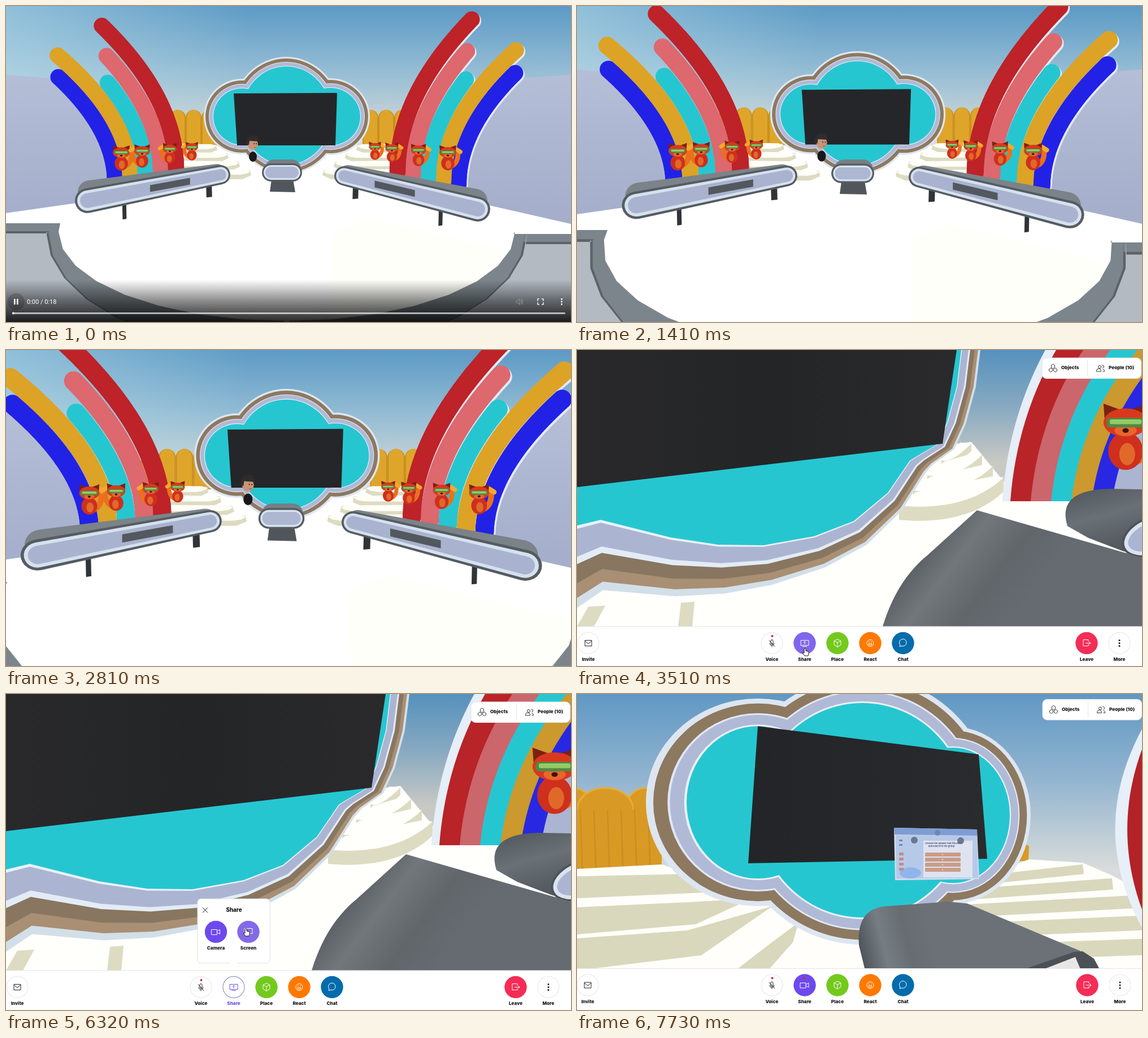
An HTML page with a canvas for the animation above (8000 ms loop, 1000 px wide and 560 px high).

```html
<!DOCTYPE html>
<html lang="en">
<head>
<meta charset="utf-8">
<title>Virtual stage</title>
<style>
html, body { margin: 0; width: 100%; height: 100%; overflow: hidden; background: #fff; }
canvas { display: block; }
</style>
</head>
<body>
<canvas id="stage" width="1000" height="560"></canvas>
<script>
const g = document.getElementById('stage').getContext('2d');
const LOOP = 8000, STEP = 702;
const CX = 495, CY = 272;
const TEAL = '#26c6d1', LAVENDER = '#abb5d2', CREAM = '#dddbc1', PURPLE = '#6c49ef';
const ARCH = ['#2222e6', '#dca326', TEAL, '#dd686e', '#bd2328'];
let zoom = 0;

const range = n => [...Array(n).keys()];
const lerp = (a, b, t) => a + (b - a) * t;
// Scenery is laid out for the left side; side 1 flips it to the right.
const mirror = (side, pts) => pts.map((v, i) => i % 2 || side < 0 ? v : 994 - v);

// Perspective dolly: k is how strongly a point approaches the camera.
function project(x, y, k) {
  if (typeof k === 'function') k = k(x, y);
  const s = 1 / (1 - k * zoom);
  return [CX + (x - CX) * s, CY + (y - CY) * s, s];
}
const deskDepth = x => .108 + .00026 * Math.abs(x - CX);
const archDepth = (x, y) => .077 + .00019 * Math.abs(x - CX) - .0001 * (y - CY);
const foxDepth = x => .09 + .00025 * Math.abs(x - CX);
const floorDepth = (x, y) => .1 + .0008 * (y - CY);

function shape(fill, pts, k = 0) {
  g.beginPath();
  for (let i = 0; i < pts.length; i += 2) {
    const [x, y] = project(pts[i], pts[i + 1], k);
    g.lineTo(x, y);
  }
  g.closePath();
  g.fillStyle = fill;
  g.fill();
}
function oval(fill, x, y, rx, ry = rx, k = 0) {
  const [px, py, s] = project(x, y, k);
  g.beginPath();
  g.ellipse(px, py, rx * s, ry * s, 0, 0, 7);
  g.fillStyle = fill;
  g.fill();
}
function draw(d, fill, stroke, width = 1) {
  const p = new Path2D(d);
  if (fill) { g.fillStyle = fill; g.fill(p); }
  if (stroke) { g.strokeStyle = stroke; g.lineWidth = width; g.stroke(p); }
}
function at(x, y, s, paint) {
  g.save();
  g.translate(x, y);
  g.scale(s, s);
  paint();
  g.restore();
}
function blend(x0, y0, x1, y1, ...stops) {
  const b = g.createLinearGradient(x0, y0, x1, y1);
  stops.forEach((c, i) => b.addColorStop(i / (stops.length - 1), c));
  return b;
}
function rect(fill, x, y, w, h, r = 0, stroke) {
  g.beginPath();
  g.roundRect(x, y, w, h, r);
  g.fillStyle = fill;
  g.fill();
  if (stroke) { g.strokeStyle = stroke; g.lineWidth = 1; g.stroke(); }
}
function text(s, x, y, size, color = '#111', align = 'center', font = '800') {
  g.font = `${font} ${size}px ${font === '800' ? 'Inter' : 'Roboto'}, sans-serif`;
  g.fillStyle = color;
  g.textAlign = align;
  g.textBaseline = 'middle';
  g.fillText(s, x, y);
}
function capsule(fill, k, x1, y1, r1, x2, y2, r2) {
  const axis = Math.atan2(y2 - y1, x2 - x1);
  shape(fill, range(26).flatMap(i => {
    const far = i < 13, a = axis - Math.PI / 2 + Math.PI * (far ? i : i - 1) / 12;
    const [x, y, r] = far ? [x2, y2, r2] : [x1, y1, r1];
    return [x + Math.cos(a) * r, y + Math.sin(a) * r];
  }), k);
}
function bend(x0, y0, cx, cy, x1, y1) {
  return range(25).flatMap(i => {
    const t = i / 24;
    return [lerp(lerp(x0, cx, t), lerp(cx, x1, t), t), lerp(lerp(y0, cy, t), lerp(cy, y1, t), t)];
  });
}
// Three overlapping lobes [x, y, rx, ry, frame x, frame y], painted from the rim inwards.
function cloud(lobes, k) {
  const rims = [[1, '#dde6f0'], [.82, '#8d7960'], [.47, '#e0e7f2'], [.41, '#b0b9d6'], [.06, '#e9f1f8'], [0, TEAL]];
  for (const [f, color] of rims)
    for (const [x, y, rx, ry, gx, gy] of lobes) oval(color, x, y, rx + gx * f, ry + gy * f, k);
}
function fox(x, y, s, flip = 1) {
  at(x, y, s, () => {
    g.scale(flip, 1);
    g.lineCap = 'round';
    draw('M6 15Q17 10 17-6', 0, '#ea701d', 8);
    draw('M13-14L21-9', 0, '#f5a92e', 7);
    for (const e of [-1, 1]) shape('#7d2014', [14 * e, -20, 3 * e, -16, 13 * e, -7]);
    oval('#cf2f1d', 0, 10, 11, 12);
    oval('#e0692a', 1, 12, 5, 7);
    oval('#d9381d', 0, -8, 14, 9);
    oval('#e8662a', 0, -3, 7, 3.5);
    rect('#4d8a45', -12, -11, 24, 6, 2);
    rect('#93cc66', -10, -10, 20, 3, 1);
    oval('#3a1510', 0, -3, 2, 1.5);
  });
}
function person(x, y, s) {
  at(x, y, s, () => {
    oval('#18181b', 1, 24, 7, 9);
    oval('#c99478', 1, 2, 9, 10);
    draw('M-10 3Q-12-12 2-14Q12-13 10-3L-5-4-6 3z', '#302c2b');
    oval('#2b2120', 3, 1, 1);
    oval('#2b2120', 7, 1, 1);
    rect('#8d5148', 3, 7, 4, 1);
  });
}

function fence(x, side) {
  for (const i of range(4)) {
    const cx = x + side * i * 28;
    for (const [c, r] of [['#c8901f', 14], ['#dfa52b', 12]]) {
      oval(c, cx, 198, r, 14, .09);
      shape(c, [cx - r, 198, cx + r, 198, cx + r, 250, cx - r, 250], .09);
    }
  }
}
function wall(side, slope) {
  const base = side < 0 ? 347 : 353;
  shape(blend(0, 120, 0, 360, '#b5bed7', '#a5afcb'),
    mirror(side, [-300, 100, 150, 133, 240, 300, 140, base, -300, base + 440 * slope]), .15);
}
function stairs(side) {
  for (const i of range(4)) {
    const y = 246 + 15 * i, e = 372 + 20 * i;
    shape(CREAM, mirror(side, [290, y, e, y, e + 2, y + 9, e - 14, y + 16, 290, y + 17]), .115);
    shape('#fffef8', mirror(side, [290, y - 2, e - 8, y - 1, e + 1, y + 2, e - 6, y + 6, e - 18, y + 8, 290, y + 8]), .115);
  }
}
// Every band is a parabola that stands upright on the floor and leans outwards.
function rainbow(side, lift, drop) {
  const heights = [187, 221, 166, 207, 255];
  const band = (i, color, shift) => {
    for (let h = 0; h <= heights[i]; h += 3) {
      const x = 193 + 27 * i - (.0029 - .00022 * i) * h * h, y = 312 - 5.5 * i + drop - h * lift;
      oval(color, (side < 0 ? x : 994 - x) + shift, y + shift, 14.3, 14.3, archDepth);
    }
  };
  if (side > 0) ARCH.forEach((_, i) => band(i, '#e3e8f3', 2.5));
  ARCH.forEach((c, i) => band(i, c, 0));
}
function desk(nx, ny, fx, fy) {
  const side = Math.sign(fx - nx), on = t => [lerp(nx, fx, t), lerp(ny, fy, t)];
  for (const [t, w, drop] of [[.275, 3.5, 46], [.91, 5, 36]]) {
    const [x, y] = on(t);
    shape('#303438', [x - w, y, x + w, y, x + w + side, y + drop - 1, x - w + side, y + drop], deskDepth);
  }
  capsule('#7b8389', deskDepth, nx + 4 * side, ny - 15, 21, fx - 7 * side, fy - 3, 16);
  for (const [c, d] of [['#555c61', 0], ['#d5e1ee', 4], ['#a9b3cf', 9]])
    capsule(c, deskDepth, nx, ny, 22 - d, fx, fy, 17 - d * .8);
  const [ax, ay] = on(.47), [bx, by] = on(.77);
  shape('#52585d', [ax, ay - 6, bx, by - 5, bx, by + 7, ax, ay + 6], deskDepth);
}
function podium() {
  shape('#50565b', [470, 307, 508, 307, 512, 330, 467, 329], .13);
  capsule('#777f85', .13, 474, 288, 16, 506, 288, 16);
  for (const [c, r] of [['#555c61', 16], ['#d8e3ef', 13], ['#adb7d2', 10]])
    capsule(c, .13, 469, 295, r, 508, 295, r);
}
function pit(side, top) {
  const ring = (rx, ry, y) => {
    const arc = range(9).flatMap(i => {
      const a = i / 8 * Math.PI / 2;
      return [493 - rx * Math.cos(a), 400 + ry * Math.sin(a)];
    });
    return mirror(side, [-300, y, 493 - rx + 3, y, ...arc, 493, 640, -300, 640]);
  };
  shape('#7c858b', ring(400, 158, top), floorDepth);
  shape('#5b6268', ring(418, 215, top + 14), floorDepth);
  shape('#b3bac2', ring(422, 215, top + 18), floorDepth);
}

function overview() {
  rect(blend(0, 0, 0, 240, '#5c9ac5', '#97bed5', '#dcdcd6'), 0, 0, 1000, 560);
  rect(blend(0, 0, 420, 90, 'rgba(195,228,236,.5)', 'rgba(195,228,236,0)'), 0, 0, 1000, 250);
  fence(360, -1);
  fence(645, 1);
  shape('#fff', [-300, 247, 1300, 247, 1300, 800, -300, 800]);
  shape('#fffffa', [580, 400, 640, 375, 885, 432, 855, 482, 740, 532, 580, 550], floorDepth);
  wall(-1, .143);
  wall(1, .227);
  stairs(-1);
  stairs(1);
  rainbow(-1, 1, 0);
  rainbow(1, 1.06, 4);

  cloud([[418, 196, 51, 50, 17, 17], [574, 196, 53, 51, 17, 17], [496, 194, 80, 87, 17, 17]], .105);
  shape('#252629', [403, 155, 586, 154, 583, 247, 409, 247], .107);
  podium();

  [204, 241, 290, 329, 653, 683, 730, 782].forEach((x, i) => {
    const off = Math.abs(x - CX);
    const [px, py, k] = project(x, 241 + .094 * off, foxDepth);
    fox(px, py - 4 * zoom, (.4 + .0023 * off) * k, i > 0 && i < 4 ? -1 : 1);
  });
  const [px, py, s] = project(436, 243, .13);
  person(px, py - 1.5 * zoom, s);

  desk(144, 345, 380, 299);
  desk(835, 360, 598, 301);
  pit(-1, 385);
  pit(1, 404);
}

function player() {
  rect(blend(0, 485, 0, 560, 'rgba(0,0,0,0)', 'rgba(0,0,0,.45)', 'rgba(0,0,0,.85)'), 0, 485, 1000, 75);
  oval('rgba(0,0,0,.18)', 18, 524, 15);
  rect('#fff', 14, 519, 2.6, 10);
  rect('#fff', 19, 519, 2.6, 10);
  text('0:00 / 0:18', 37, 524.5, 11, '#fff', 'left', '400');
  g.lineCap = 'butt';
  at(908, 524, 1, () => draw('M-5-2h3l3-3v10l-3-3h-3zM3-3a4 4 0 0 1 0 6M4-5a6 6 0 0 1 0 10', 0, '#8b8b8b', 1.2));
  at(946, 524, 1, () => draw('M-5-1v-4h3M2-5h3v4M5 1v4h-3M-2 5h-3v-4', 0, '#eee', 1.5));
  for (const o of [-4.5, 0, 4.5]) oval('#fff', 983.5, 524 + o, 1.4);
  rect('rgba(255,255,255,.65)', 11, 543, 979, 3, 1.5);
  oval('#fff', 13, 544.5, 2);
}

// One key outline; the frame layers are the same outline pushed further out.
function nearFrame() {
  const key = [0, 311, 42, 301, 165, 332, 250, 345, 330, 346, 420, 330, 490, 303,
    550, 253, 589, 196, 600, 189, 636, 168, 655, 128, 672, 65, 680, 0];
  const layers = [[1, '#d2dfe9'], [.88, '#a98f73'], [.7, '#887660'], [.47, '#e3ecf6'],
    [.38, LAVENDER], [.04, '#e9f2f9'], [0, TEAL]];
  for (const [f, color] of layers) {
    const edge = key.map((v, i) => {
      const t = (i >> 1) / 13;
      return v + f * (i % 2 ? 146 * (1 - t) ** 2 : 34 * Math.sin(t * Math.PI / 2));
    });
    shape(color, [0, 0, ...edge]);
  }
  shape(blend(0, 0, 670, 0, '#29292b', '#242527', '#2a2a2c'), [0, 0, 672, 0, 647, 166, 0, 243]);
}
function closeUp() {
  rect(blend(0, 0, 0, 200, '#5591bd', '#87a9c1', '#c9c9c4'), 0, 0, 1000, 560);
  shape('#fffffc', [640, 170, 698, 163, 757, 235, 768, 268, 1000, 268, 1000, 490, 0, 490, 0, 400, 560, 250]);
  for (const i of range(4)) {
    const h = 13 + 4 * i, x = 698 + 19 * i, y = 166 + 20 * i;
    const lx = 645 - 25 * i, ly = 195 + 27 * i, mx = 660 + 10 * i, my = 195 + 28 * i;
    shape('#fffffc', [lx, ly, lx + 30, ly - 24, x - 20, y - 2, x, y, mx, my]);
    shape(CREAM, [lx, ly, ...bend(lx, ly, mx, my + 8, x, y), ...bend(x, y + h, mx, my + 8 + h, lx, ly + h)]);
  }
  shape(CREAM, [0, 490, 20, 455, 50, 453, 30, 490]);
  shape(CREAM, [184, 448, 208, 446, 204, 490, 179, 490]);

  const bands = ['#b82427', '#cb666c', TEAL, '#cb992d', '#2828e2', LAVENDER];
  ['#e6eef7', ...bands].forEach((c, n) => {
    const i = n ? n - 1 : -.4, x = 767 + 36 * i;
    shape(c, [...bend(x, 268, x + 11 + 2 * i, 122, 848 + 48 * i, 0), 1200, 0, 1200, 268]);
  });
  nearFrame();
  fox(971, 151, 2.8);

  shape(blend(900, 245, 930, 350, '#53595e', '#6a7176', '#555b60'),
    [...bend(868, 312, 848, 247, 945, 246), 1000, 247, 1000, 366, 965, 356, 905, 333]);
  g.save();
  g.translate(1016, 330);
  g.rotate(-.4);
  for (const [c, d] of [['#4d5358', 0], ['#d9e4f0', 4], [LAVENDER, 11]]) oval(c, 0, 0, 54 - d, 34 - d);
  g.restore();
  shape(blend(590, 360, 760, 490, '#54595e', '#71777b', '#60666a', '#656b70'),
    [...bend(541, 490, 566, 408, 620, 364), 708, 284, 1000, 368, 1000, 490]);
}

function sharedPanel() {
  shape('#d4dbea', [561, 237, 708, 240, 712, 328, 563, 330]);
  shape('#b7c9e8', [564, 250, 708, 251, 710, 326, 565, 327]);
  shape('#7f9cd3', [561, 237, 708, 240, 708, 251, 562, 249]);
  rect('#dfe2ef', 613, 260, 87, 65);
  oval('#8fb5ec', 590, 317, 19, 10);
  oval('#667992', 597, 259, 6);
  oval('#667992', 679, 260, 6);
  oval('#7482b8', 638, 246, 5);
  text('Choose the answer that fits best', 648, 265, 4, '#57608c');
  text('and send it to the group', 645, 270, 4, '#57608c');
  for (const i of range(4)) {
    rect('#c99c88', 616, 281 + i * 9, 63, 7, 1.5);
    oval('#e7cbbd', 647, 284.5 + i * 9, 1.3);
    rect('#c58a86', 570, 281 + i * 9, 8, 5, 1);
  }
  rect('#6f85b5', 570, 258, 6, 3);
  rect('#6f85b5', 570, 266, 6, 3);
}

function reveal() {
  rect(blend(0, 0, 0, 310, '#6098c4', '#94b5d0', '#d8dcda'), 0, 0, 1000, 560);
  for (const x of [-8, 122, 50]) {
    const r = x === 50 ? 50 : 37;
    oval('#e8ac35', x, 202, r, 37);
    oval('#d89a25', x, 205, r - 2, 37);
  }
  rect('#d89a25', 0, 205, 150, 110);
  for (let x = 5; x < 140; x += 24) shape('#cb8e20', [x, 205, x + 2, 205, x + 6, 312, x + 3, 312]);
  shape('#d89a25', [780, 255, 800, 270, 799, 296, 770, 296]);

  shape('#fffefa', [0, 310, 150, 302, 300, 350, 700, 330, 800, 293, 895, 299, 948, 322, 1000, 350, 1000, 490, 0, 490]);
  for (const i of range(3)) {
    const y = 323 + 55 * i;
    shape('#d9d8bd', [0, y, 195, y - 4 - 5 * i, 270 + 38 * i, 350 + 13 * i, 200 + 10 * i, y + 30, 0, y + 39 + 9 * i]);
  }
  shape('#d9d8bd', [392, 405, 382, 440, 338, 490, 280, 490, 345, 440]);
  for (const i of range(5)) {
    const y = 302 + 22 * i + 2.5 * i * i, x = 745 - 28 * i, h = 17 + 3 * i;
    shape('#d9d8bd', [x, y + 17, 895 + 52 * i, y, 897 + 52 * i, y + h, x - 10, y + 17 + h]);
  }
  shape('#e7eff8', bend(1000, 62, 905, 240, 1000, 414));
  shape('#b32226', bend(1000, 98, 948, 240, 1000, 382));

  cloud([[320, 192, 126, 135, 72, 49], [665, 215, 101, 120, 37, 37], [505, 206, 185, 190, 50, 48]], 0);
  shape(blend(310, 0, 720, 0, '#232528', '#25272a', '#2a2b2d'), [320, 57, 711, 107, 726, 292, 303, 300]);
  sharedPanel();

  shape(blend(498, 440, 620, 410, '#4f555a', '#777e83', '#666c71', '#6b7176'),
    [510, 490, ...bend(499, 445, 494, 378, 550, 376), 655, 368, 690, 371, 890, 455, 915, 470, 926, 490]);
  shape('#4b5156', [785, 490, 880, 457, 895, 456, 915, 469, 926, 490]);
  shape('#e7e8e5', [820, 490, 882, 466, 892, 490]);
}

const ICON = {
  mail: 'M-6-5h12v10h-12zM-6-4l6 5 6-5',
  mic: 'M-2-4a2 2 0 0 1 4 0v4a2 2 0 0 1-4 0zM-4 0a4 4 0 0 0 8 0M0 4v3M-5-5l10 11',
  share: 'M-7-5h14v9h-14zM0 2v-5M-2-1l2-2 2 2M-4 6h8',
  cube: 'M0-7l6 3v7l-6 4-6-4v-7zM-6-4l6 3 6-3M0-1v8',
  smile: 'M-6 0a6 6 0 1 1 12 0a6 6 0 1 1-12 0M-3 1a3 3 0 0 0 6 0zM-2-3v2M2-3v2',
  chat: 'M-6 6l1-3a6.3 6.3 0 1 1 3 2z',
  leave: 'M3-3v-3h-9v11h9v-3M-2 0h9M4-3l3 3-3 3',
  camera: 'M-8-4h10v9h-10zM2-1l5-3v8l-5-3',
  screen: 'M-7-6h14v9h-14zM-3 6h6M0 3v3',
  close: 'M-4.5-4.5l9 9M4.5-4.5l-9 9',
  objects: 'M0-7l3 2v4l-3 2-3-2v-4zM-4 0l3 2v3l-3 2-3-2v-3zM4 0l3 2v3l-3 2-3-2v-3z',
  people: 'M-4-2a2.5 2.5 0 1 1 5 0a2.5 2.5 0 1 1-5 0M-7 6v-1a4 4 0 0 1 8 0v1zM3-5a2.5 2.5 0 1 1 1 5M4 2a3.5 3.5 0 0 1 3 4h-3'
};
function icon(name, x, y, color) {
  at(x, y, 1, () => draw(ICON[name], 0, color));
}
function button(x, y, label, art, fill, ink = '#fff', rim = '', labelColor = '#111') {
  oval(rim || fill, x, y, 19.5);
  oval(fill, x, y, rim ? 18.5 : 19.5);
  if (art) icon(art, x, y, ink);
  text(label, x, y + 29.5, 8.2, labelColor);
}

function toolbar(mode) {
  const late = mode === 'sharing', d = late ? 1 : 0, y = late ? 516 : 519.5;
  rect('#fff', 0, y - 29.5, 1000, 100);
  rect('#e4e4e9', 0, y - 30, 1000, 1);
  const plain = ['#fff', '#222', '#e6e6ec'];
  button(20 - d, y, 'Invite', 'mail', ...plain);
  button(345, y, 'Voice', 'mic', ...plain);
  oval('#e3253e', 345.5, y - 12.5, 2);
  if (late) {
    button(403, y, 'Share', 'camera', PURPLE);
    oval('#e3253e', 402.5, y - 12.5, 2);
  } else if (mode === 'menu') button(403, y, 'Share', 'share', '#fff', PURPLE, '#7b83bd', PURPLE);
  else button(403, y, 'Share', 'share', '#8165ed');
  button(461, y, 'Place', 'cube', '#73c91d');
  button(519, y, 'React', 'smile', '#ff7900');
  button(577, y, 'Chat', 'chat', '#046bac');
  button(902 + d, y, 'Leave', 'leave', '#f52c55');
  button(960 + d, y, 'More', '', ...plain);
  for (const o of [-5, 0, 5]) oval('#111', 960 + d, y + o, 1.5);

  const top = late ? 9.5 : 14;
  rect('#fff', 823 + d, top, 175.5, 36.5, 8, '#e4e6ec');
  rect('#e7e7ec', 903 + d, top + 4, 1, 28);
  icon('objects', 842.5 + d, top + 18, '#333');
  icon('people', 926.5 + d, top + 18, '#333');
  text('Objects', 857 + d, top + 18, 8.2, '#111', 'left');
  text('People (10)', 941 + d, top + 18, 8.2, '#111', 'left');
}
function menu(hover) {
  rect('#fff', 339, 363, 128, 114, 6, '#dfe0e8');
  shape('#fff', [396, 476, 410, 476, 403, 484]);
  icon('close', 352.5, 383, '#111');
  text('Share', 403.5, 383, 9.8);
  button(371.5, 421.5, 'Camera', 'camera', PURPLE);
  button(429, 421.5, 'Screen', 'screen', hover ? '#8369e8' : PURPLE);
}
const arrow = (x, y) => at(x, y, 1, () => draw('M0 0v12l3-3 2 5 2-1-2-5h4z', '#111', '#fff', .8));
const hand = (x, y) => at(x, y, 1, () => draw('M-2 0v-5a1.5 1.5 0 0 1 3 0v3l4 1q2 1 1 4l-1 4h-6l-4-5q0-2 3 0z', '#fff', '#111', 1));

function render(step) {
  zoom = step < 5 ? step / 4 : 0;
  g.lineJoin = 'round';
  if (step < 5) {
    overview();
    if (step === 0) player();
  } else if (step < 10) {
    closeUp();
    toolbar(step === 5 ? 'idle' : 'menu');
    if (step > 5) menu(step === 9);
    if (step < 7) hand(404, 535);
    else if (step === 7) arrow(409.5, 472);
    else if (step === 8) arrow(418, 447);
    else hand(425, 422);
  } else {
    reveal();
    toolbar('sharing');
  }
}

const start = performance.now();
let shown = -1;
function frame() {
  const step = Math.floor((performance.now() - start) % LOOP / STEP);
  if (step !== shown) render(shown = step);
  requestAnimationFrame(frame);
}
frame();
</script>
</body>
</html>
```
